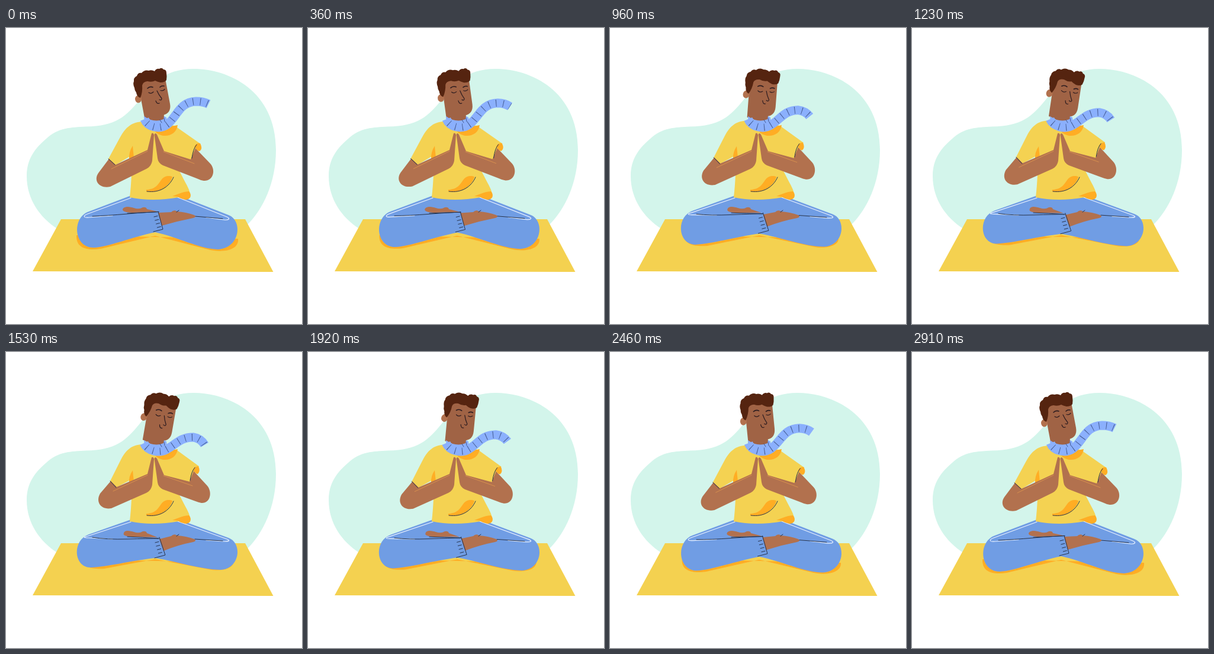
Animation, 500 px wide and 500 px high, one loop 2.94 s. Source, as an HTML page:

```html
<!DOCTYPE html>
<html lang="en">
<head>
<meta charset="utf-8">
<title>Meditation</title>
<style>
  html, body { margin: 0; width: 100%; height: 100%; overflow: hidden; background: #fff; }
  svg { display: block; width: 100vw; height: 100vh; }
</style>
</head>
<body>
<svg viewBox="0 0 500 500" fill="none" stroke-linecap="round" stroke-linejoin="round"></svg>
<script>
const MINT = '#d3f5eb', MAT = '#f4d150', SHIRT = '#f4d252', ORANGE = '#ffad24';
const JEANS = '#709de4', SCARF = '#8bb0fd', INK = '#26324a', SKIN = '#b2714e';
const FACE = '#a06345', HAIR = '#552410', EDGE = '#d8904f', SEAM = '#e8f1ff';

const LOOP = 2940, STEP = 30;
const svg = document.querySelector('svg');
const moving = [];

function add(tag, attrs, parent = svg) {
  const el = document.createElementNS('http://www.w3.org/2000/svg', tag);
  for (const key in attrs) el.setAttribute(key, attrs[key]);
  parent.append(el);
  return el;
}

// "a~b" in a path is a number that travels from a to b.
const blend = (d, p) => d.replace(/([\d.]+)~([\d.]+)/g, (_, a, b) => (+a + (b - a) * p).toFixed(2));

function path(d, attrs, parent) {
  const el = add('path', { d: blend(d, 0), ...attrs }, parent);
  if (d.includes('~')) moving.push([el, d]);
}
const shape = (fill, d, parent) => path(d, { fill }, parent);
const line = (stroke, d, width = 1, parent) => path(d, { stroke, 'stroke-width': width }, parent);

// Background and mat
shape(MINT, 'M85 338C58 320 35 290 35 250C35 222 48 204 68 187C88 168 110 168 135 166.500C186 166 203 149 226 121C246 96 266 69 317 69C376 69 456 106 456 206C456 262 434 306 408 332Z');
shape(MAT, 'M93 323H404L451.500 412L45 411Z');
shape(ORANGE, 'M119~130 350C118~126 373~365 138~150 376~367 160~166 373~366L252 351~350L345~342 375~367C370~362 380~371 394~382 374~367 392~384 356Z');

// Legs
shape(JEANS, 'M211 283L140 310~308C111 320~318 114 371~364 148~143 371~364C172~170 370~363 214 353~352 252 345~348C290 353~354 326 373~367 358~363 374~368C396~395 372~366 400 325~323 376 316~314L292 283Z');
line(SEAM, 'M211 287L138 314~311C130 317~313 130 321~314 140 320~314L180 317~316', 1.2);
line(INK, 'M146 318~313Q170 317~317 205 314~316T258 310.500~315');
line(SEAM, 'M290 286L373 319~316C380 322~319 376 325~320 368 324~320L338 320~318', 1.2);
line(INK, 'M319 318~316L366 322~319');

// Torso
shape(SHIRT, 'M231~230 158~156C213 159~157 203 166~164 192~193 186~184L173~176 221~218L184~186 232~229L214 214C212 240 212 262 209 286Q246 294 292 286Q304 290 309 288C314 282 309 272 303 261L291 238L314~311 221~218L329~326 196~193L289 168~166Q275 160 258 160Z');
shape(ORANGE, 'M214 199~200Q207 210 208 222L216 219Z');
shape(ORANGE, 'M250 172C258 187 287 186 290 164Z');
shape(ORANGE, 'M281 284C293 280 300 276 309 276C314 281 313 290 303 290Q296 289 290 285Z');
shape(ORANGE, 'M237 273C252 273 257 264 262 257C267 249 276 249 281 251C278 264 262 280 237 276Z');
line(INK, 'M238 276C260 279 276 268 283 252');

// Feet and cuff
shape(SKIN, 'M197~199 306C200 300 210 302 216 304Q225 307 231 303Q237 302 238 306L256 310~313L213 312Q196 311 197~199 306Z');
line(INK, 'M205 313~312Q230 312~313 258 310.500~315');
shape(SKIN, 'M257~259 312~316L279 311Q284 306 289 310Q304 311 318 316Q323 319 316 321Q290 326 263~266 334~336Z');
line(INK, 'M288 311L292 308');
line(INK, 'M257~259 310~313L265~269 340~343L249~251 344~348');
for (let i = 0; i < 4; i++) {
  const x = 250 + i * 1.8, y = 319 + i * 6;
  line(INK, `M${x}~${x + 2} ${y}~${y + 3}L${x + 6}~${x + 8} ${y - 1.5}~${y + 1.5}`);
}

// Arms
shape(SKIN, 'M185~187 231~228L174~177 221~218L156~159 245~239C147~151 258~253 158~160 272~267 176~178 268~264L237 238C243 235 246 230 247 224L250 181Q249 176 246 178L239 206Z');
line(EDGE, 'M178~181 238~235L239 208');
line(INK, 'M173~176 221~218L184~186 231~229');
shape(SKIN, 'M250.500 180Q252 176 255 180L267 208L312~310 222~219L320~317 203~201L345~340 229~226C355~349 240~237 350~345 259~256 334~330 258~255Q328~325 257~254 322~320 254~252L265 232Q257 228 256 220Z');
line(EDGE, 'M266 209L318~315 229~226');
shape(ORANGE, 'M318~316 201~200Q322~319 193 328~325 195~193Q333~329 204~201 327~324 208~206Q323~320 208~206 321~318 203~201Z');
line(INK, 'M314~311 220~217Q316~313 204~202 322~319 197~195');

// Neck and head
shape(FACE, 'M236~235 140H266L268 160H240Z');
const head = add('g', {});
shape(FACE, 'M224 98L228 82L268 80L277 128C279 139 274 145 266 147Q258 156 250 158L235 157L228 120Z', head);
add('ellipse', { cx: 223.5, cy: 120, rx: 5.5, ry: 6.5, fill: SKIN }, head);
shape(HAIR, 'M227 118Q221 116 220 109Q217 105 217 101Q214 95 216 90Q215 84 221 81Q223 75 229 76Q234 70 241 72Q246 70 251 73Q254 68 259 69Q263 66 266 70Q271 70 271 76Q272 82 271 88Q268 92 261 92Q256 91 252 89Q246 92 239 90Q231 91 230 97Q231 108 227 118Z', head);
for (const d of ['M241 109Q245 112 249 108', 'M261 105.500Q265 107 268 103.500', 'M253 123Q255 129 259 127'])
  line('#2c1c20', d, 1.2, head);
line('#2c1c20', 'M239 102Q243 98 248 100', 1.6, head);
line('#2c1c20', 'M260 100Q263 97 267 98', 1.6, head);
line('#2c1c20', 'M255 106Q258 113 263 119Q263 123 259 121', 1.2, head);

// Scarf
const scarf = 'M234~233 154C239 167 259 172 272 163~164C289~287 151~156 292~295 125~144 321~316 124~144Q333~329 124~146 342~335.500 128.500~157';
shape(SCARF, 'M233 149Q250 161 266 154L267 149L271 151L272 161L250 168L234 160Z');
path(scarf, { stroke: SCARF, 'stroke-width': 15, 'stroke-linecap': 'butt' });
path(scarf, { stroke: '#435a91', 'stroke-width': 12, 'stroke-linecap': 'butt', 'stroke-dasharray': '1 11', 'stroke-dashoffset': -8 });
line('#435a91', 'M260 155L263 160');
line('#435a91', 'M267 152L268 158');

function draw(now) {
  const t = Math.floor((now % LOOP) / STEP) * STEP;
  const p = (1 - Math.cos(2 * Math.PI * t / LOOP)) / 2;
  for (const [el, d] of moving) el.setAttribute('d', blend(d, p));
  head.setAttribute('transform', `rotate(${20.5 * p} 257 141)`);
}

const start = performance.now();
function tick() {
  draw(performance.now() - start);
  requestAnimationFrame(tick);
}
tick();
</script>
</body>
</html>
```
